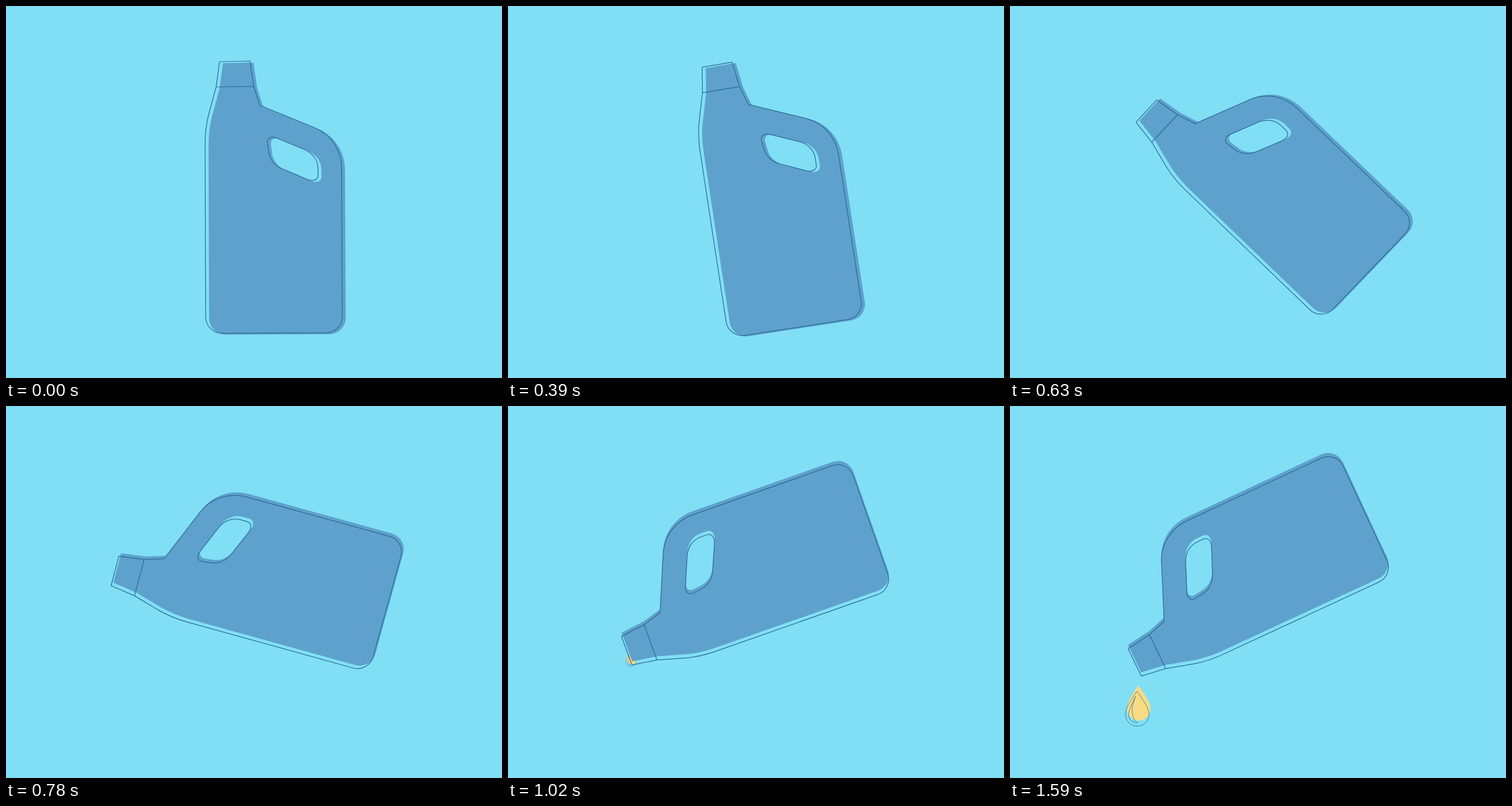
Animation, 864 px wide and 648 px high, one loop 2.4 s. Source, as an HTML page:

```html
<!DOCTYPE html>
<html lang="en">
<head>
<meta charset="utf-8">
<title>Pouring bottle</title>
<style>
  html, body { margin: 0; height: 100%; overflow: hidden; background: #80dff5; }
  svg { display: block; width: 100vw; height: 100vh; }
  .line { fill: none; stroke: #2b6893; stroke-width: 1.25; stroke-linejoin: round; }
  .thin { stroke-width: .8; }
</style>
</head>
<body>
<svg viewBox="0 0 864 648">
  <defs>
    <path id="body" d="M372 97 L425 96 L431.5 140 L442 173 L538 212
      C566.7 223.7 584.5 252 584.5 283 L585.8 541 A28.5 28.5 0 0 1 557.5 569.3
      L376 570 A28.5 28.5 0 0 1 347.8 541 L346.8 240 Q347 214 352.5 191 L366 141 Z
      M471 230 L520 250 C534 256 543 268 543.5 282 L543.5 295
      C543.5 303 535 306 526 302.5 L481 283.5 C468 278 459 267 457.5 254
      L455.5 239 C454.5 230 462 226 471 230 Z"/>
    <path id="tear" d="M0 0 C-8 12 -20 27 -20 40.5 A20.5 20.5 0 0 0 21 40.5 C21 27 8 12 0 0 Z"/>
  </defs>
  <g id="drop">
    <use href="#tear" x="2.5" y="-9.7" fill="#f8dc85"/>
    <use href="#tear" class="line thin"/>
    <path class="line thin" d="M-2.5 9 C-7 20 -14.5 30 -14.5 41 C-14.5 50 -8 55 .5 55
      C-4 52 -8.5 44 -8.5 33 C-8.5 25 -5 17 -2.5 9 Z"/>
  </g>
  <g id="bottle">
    <use href="#body" x="6" y="2.4" fill="#5ea1cc" fill-rule="evenodd"/>
    <use href="#body" class="line"/>
    <path class="line" d="M366 141 L431.5 140"/>
  </g>
</svg>
<script>
  const LOOP = 2400, STEP = 30, TILT = 114.7, PIVOT = '420 329.6';
  const bottle = document.getElementById('bottle');
  const drop = document.getElementById('drop');

  // Eased progress from 0 to 1 between two times
  function ease(t, start, end) {
    const s = Math.min(1, Math.max(0, (t - start) / (end - start)));
    return s * s * (3 - 2 * s);
  }

  function draw(now) {
    const t = Math.floor(now % LOOP / STEP) * STEP;
    const turn = ease(t, 240, 1140);
    const left = 1 - ease(t, 900, 1595);
    const size = ease(t, 870, 1200);
    bottle.setAttribute('transform', `rotate(${-TILT * turn} ${PIVOT})`);
    // The drop hangs on the bottle and is upright once the bottle is fully tilted
    drop.setAttribute('transform',
      `rotate(${TILT * (1 - turn)} ${PIVOT}) translate(${221.2 + 5.3 * left} ${496.8 - 54 * left}) scale(${size})`);
    requestAnimationFrame(draw);
  }
  draw(0);
</script>
</body>
</html>
```
